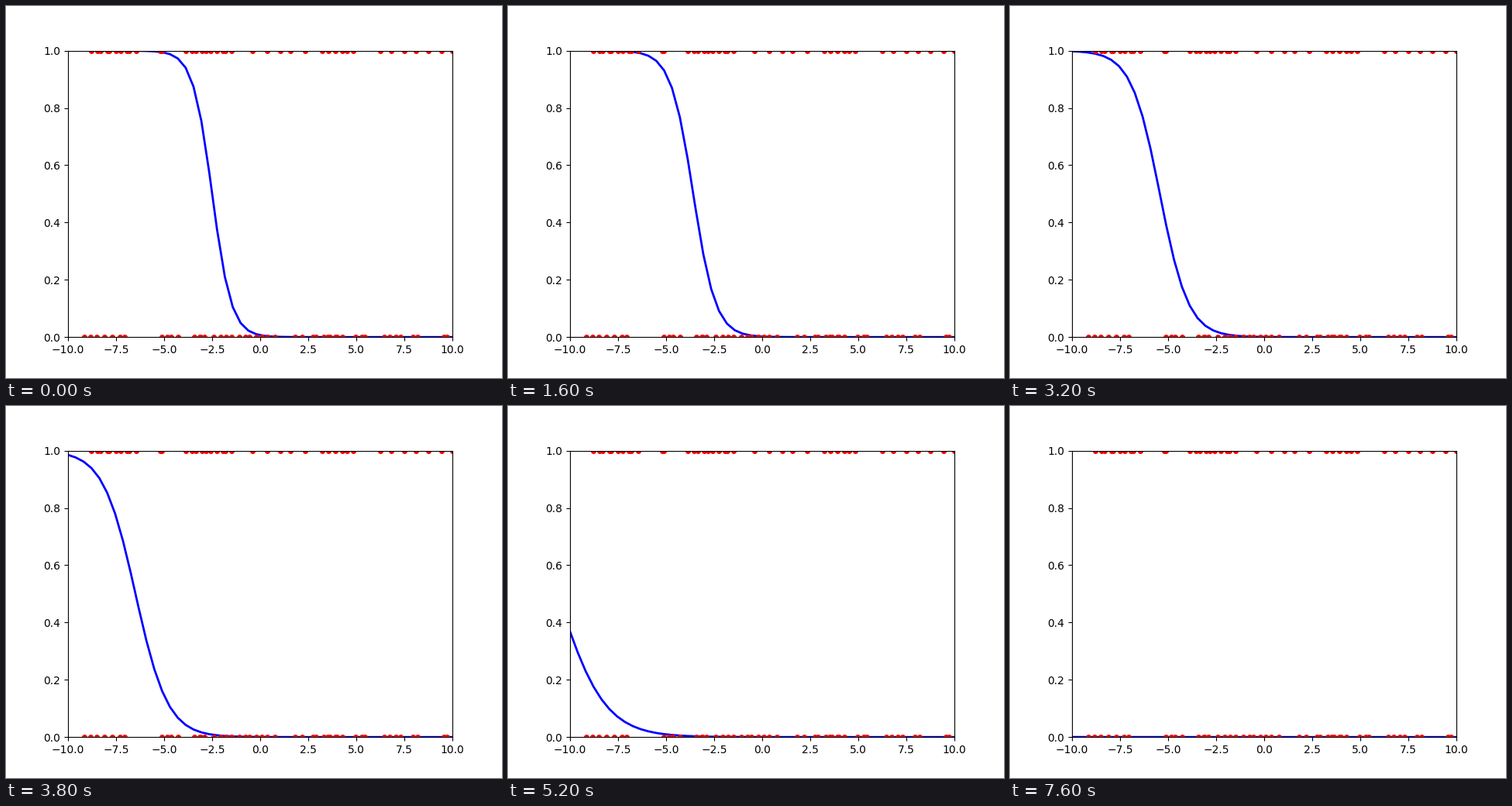
These frames come from a looping animation (640x480 px, 8 s). A matplotlib script:

```python
import matplotlib.pyplot as plt
import numpy as np
from matplotlib.animation import FuncAnimation

FRAMES = 40
INTERVAL = 200
LAST_STEP = 38  # the curve rests after this step

# Samples of each class come in clusters: (left, right, count)
ONES = [(-8.81, -6.47, 10), (-5.22, -5.14, 2), (-3.89, -1.51, 10),
        (-0.42, 2.32, 5), (3.21, 4.82, 6), (6.27, 9.98, 7)]
ZEROS = [(-9.17, -7.04, 7), (-5.14, -4.29, 4), (-3.41, -2.92, 4),
         (-2.4, 0.75, 11), (1.83, 2.16, 2), (2.76, 4.29, 8),
         (4.94, 5.46, 3), (6.47, 7.28, 4), (7.96, 8.17, 2),
         (9.54, 9.7, 2)]

rng = np.random.default_rng(4)


def scatter_clusters(clusters):
    xs = []
    for left, right, count in clusters:
        x = np.linspace(left, right, count)
        x[1:-1] += rng.uniform(-0.1, 0.1, count - 2)
        xs.extend(x)
    return xs


def sigmoid(z):
    return 1 / (1 + np.exp(-z))


fig, ax = plt.subplots(figsize=(6.4, 4.8), dpi=100)
ax.set_xlim(-10, 10)
ax.set_ylim(0, 1)

grid = np.linspace(-10, 10, 50)
curve, = ax.plot([], [], color="blue", lw=2)
for label, clusters in ((1, ONES), (0, ZEROS)):
    x = scatter_clusters(clusters)
    ax.plot(x, np.full(len(x), label), "ro", ms=4)


def update(i):
    step = min(i, LAST_STEP)
    weight = -2 + 0.0286 * step + 0.00096 * step**2 - 1.22e-5 * step**3
    bias = -5 - 0.1445 * step
    curve.set_data(grid, sigmoid(weight * grid + bias))
    return curve,


anim = FuncAnimation(fig, update, frames=FRAMES, interval=INTERVAL,
                     repeat=True, repeat_delay=0)
plt.show()
```
